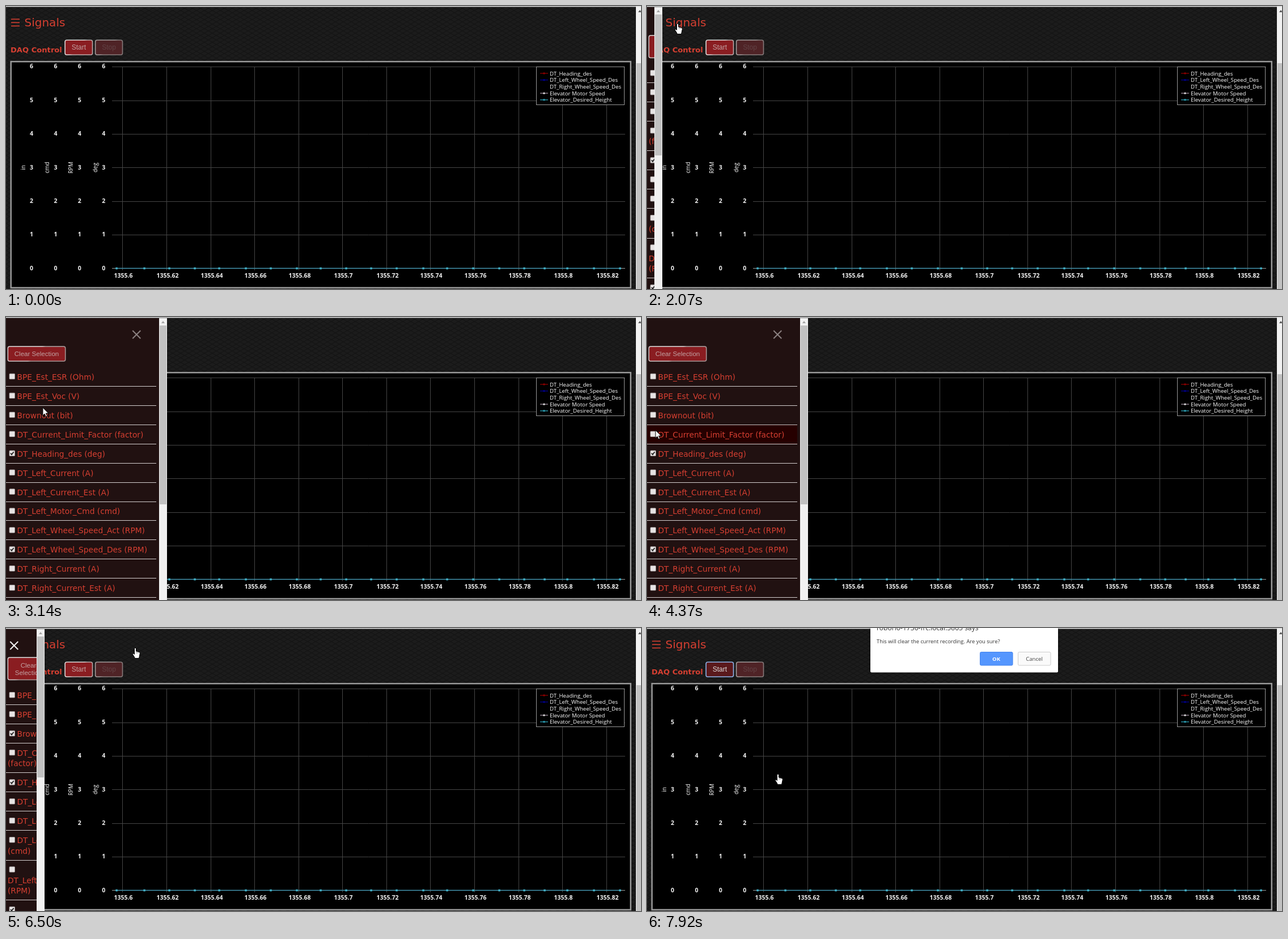
An HTML page with a canvas that plays this animation: 1120x500 px, repeating every 7990 ms.

```html
<!DOCTYPE html>
<html lang="en">
<head>
<meta charset="utf-8">
<title>Signals</title>
<style>
html, body { margin: 0; width: 100%; height: 100%; overflow: hidden; background: #1a1a1a; }
canvas { display: block; }
</style>
</head>
<body>
<canvas id="stage" width="1120" height="500"></canvas>
<script>
const ctx = document.getElementById('stage').getContext('2d');
const LOOP = 7990, PANEL = 284, BAR = 14, RED = '#d63f31';
const VERDANA = '"DejaVu Sans", sans-serif';
const HUMANIST = '"Open Sans", sans-serif';
const ARIAL = '"Liberation Sans", sans-serif';

const signals = ['DT_Heading_des', 'DT_Left_Wheel_Speed_Des', 'DT_Right_Wheel_Speed_Des',
  'Elevator Motor Speed', 'Elevator_Desired_Height'];
const dotColors = ['#f00', '#00f', '#0f0', '#f0f', '#0ff'];
const lineColors = ['#8b0000', '#00008b', '#000', '#9a8a9a', '#2b9db2'];
const samples = [195, 244, 288, 333, 376, 423, 467, 513, 555, 600, 644, 689, 736, 778,
  824, 870, 914, 950, 990, 1037, 1083];
const items = ['BPE_Est_ESR (Ohm)', 'BPE_Est_Voc (V)', 'Brownout (bit)',
  'DT_Current_Limit_Factor (factor)', 'DT_Heading_des (deg)', 'DT_Left_Current (A)',
  'DT_Left_Current_Est (A)', 'DT_Left_Motor_Cmd (cmd)', 'DT_Left_Wheel_Speed_Act (RPM)',
  'DT_Left_Wheel_Speed_Des (RPM)', 'DT_Right_Current (A)', 'DT_Right_Current_Est (A)'];

// Pointer path: time, x, y
const path = [[70, 870, 467], [770, 431, 244], [840, 377, 215], [1690, 59, 34], [1920, 54, 31],
  [2520, 54, 31], [2840, 57, 61], [3140, 65, 160], [3690, 20, 217], [3920, 20, 217],
  [4000, 18, 217], [4150, 18, 217], [4750, 10, 171], [5250, 10, 171], [5400, 60, 140],
  [5540, 131, 126], [6080, 226, 40], [6150, 228, 35], [6800, 228, 35], [7230, 110, 75],
  [7480, 110, 75], [7920, 231, 258]];

const clamp = (v, lo, hi) => Math.min(hi, Math.max(lo, v));

function pointer(t) {
  let i = path.findIndex(p => p[0] > t);
  if (i < 0) return path[path.length - 1].slice(1);
  if (!i) return path[0].slice(1);
  const [t0, x0, y0] = path[i - 1], [t1, x1, y1] = path[i], k = (t - t0) / (t1 - t0);
  return [x0 + (x1 - x0) * k, y0 + (y1 - y0) * k];
}

// CSS "ease": cubic-bezier(.25, .1, .25, 1)
function ease(x) {
  if (x <= 0 || x >= 1) return clamp(x, 0, 1);
  const bez = (a, b, s) => 3 * a * s * (1 - s) ** 2 + 3 * b * s * s * (1 - s) + s ** 3;
  let lo = 0, hi = 1;
  for (let i = 0; i < 20; i++) {
    const mid = (lo + hi) / 2;
    if (bez(.25, .25, mid) < x) lo = mid; else hi = mid;
  }
  return bez(.1, 1, lo);
}

function rect(x, y, w, h, fill) {
  ctx.fillStyle = fill;
  ctx.fillRect(x, y, w, h);
}

function line(points, color, width = 1, close = false) {
  ctx.beginPath();
  points.forEach(([x, y]) => ctx.lineTo(x, y));
  if (close) ctx.closePath();
  ctx.strokeStyle = color;
  ctx.lineWidth = width;
  ctx.stroke();
}

function disc(x, y, r, fill) {
  ctx.beginPath();
  ctx.arc(x, y, r, 0, 7);
  ctx.fillStyle = fill;
  ctx.fill();
}

function text(s, x, y, font, color, align = 'left') {
  ctx.font = font;
  ctx.fillStyle = color;
  ctx.textAlign = align;
  ctx.fillText(s, x, y);
}

function roundBox(x, y, w, h, r, fill, stroke, width = 1) {
  ctx.beginPath();
  ctx.roundRect(x, y, w, h, r);
  ctx.fillStyle = fill;
  ctx.fill();
  if (stroke) {
    ctx.strokeStyle = stroke;
    ctx.lineWidth = width;
    ctx.stroke();
  }
}

// Outset border: light at the top left, darker at the bottom right.
function outset(x, y, w, h, light, dark) {
  const g = ctx.createLinearGradient(x + w / 2 - h / 2, y, x + w / 2 + h / 2, y + h);
  g.addColorStop(.45, light);
  g.addColorStop(.55, dark);
  return g;
}

function button(lines, x, y, w, h, fill, border, color, size) {
  roundBox(x + .8, y + .8, w - 1.6, h - 1.6, 3, fill, border, 1.6);
  lines.forEach((s, i) => text(s, x + w / 2, y + h / 2 + 4.2 + (i - (lines.length - 1) / 2) * 13,
    size + 'px ' + ARIAL, color, 'center'));
}

function makeTexture() {
  const tile = document.createElement('canvas');
  tile.width = 14;
  tile.height = 8;
  const g = tile.getContext('2d');
  g.fillStyle = '#1c1c1c';
  g.fillRect(0, 0, 14, 8);
  g.strokeStyle = '#161616';
  g.lineWidth = 1.2;
  g.beginPath();
  g.moveTo(0, 0); g.lineTo(14, 8);
  g.moveTo(14, 0); g.lineTo(0, 8);
  g.stroke();
  return ctx.createPattern(tile, 'repeat');
}
const texture = makeTexture();

function drawPage(t) {
  rect(0, 0, 1120, 500, texture);
  for (let i = 0; i < 3; i++) rect(9, 22.5 + i * 6, 15, 1.6, RED);
  text('Signals', 32.5, 36, '20px ' + VERDANA, RED);
  text('DAQ Control', 8, 82, 'bold 13.1px ' + VERDANA, RED);
  const hover = t > 7200, focus = t > 7530;
  button(['Start'], 103.3, 59.5, 50, 27.5, hover ? '#5a191c' : '#8a1d21',
    focus ? '#8fb4ea' : outset(103, 59, 50, 28, '#e2dada', '#b9a8a8'),
    hover ? '#ddd' : '#c2a3a4', 12);
  button(['Stop'], 156.8, 59.5, 49.5, 27.5, '#4f2326',
    outset(157, 59, 50, 28, '#a39c9c', '#857a7a'), '#624346', 12);
}

function drawChart() {
  rect(7.5, 97, 1095.5, 402, '#999');
  rect(10, 99.5, 1090.5, 397, '#000');
  for (let i = 0; i < 12; i++) {
    const x = Math.round(205.4 + i * 77.57) + .5;
    line([[x, 107], [x, 467]], '#454545');
    text(String(+(1355.6 + i * .02).toFixed(2)), x + 1.5, 479.7, 'bold 10.5px ' + HUMANIST, '#f2f2f2', 'center');
  }
  ['in', 'cmd', 'RPM', 'deg'].forEach((unit, i) => {
    const x = 45 + i * 42.4;
    for (let k = 0; k < 7; k++)
      text(6 - k, x, 110.3 + k * 59.4, 'bold 10.5px ' + HUMANIST, '#f2f2f2', 'center');
    ctx.save();
    ctx.translate(x - 11.5, 285.5);
    ctx.rotate(-Math.PI / 2);
    text(unit, 0, 0, '10px ' + HUMANIST, '#fff', 'center');
    ctx.restore();
  });
  for (let k = 0; k < 7; k++) {
    const y = Math.round(107.3 + k * 59.33) + .5;
    line([[187, y], [1092, y]], k < 6 ? '#454545' : '#999');
  }
  line([[195, 463.5], [1083, 463.5]], '#4496b0', 1.4);
  samples.forEach(x => rect(x - 1.7, 461.8, 3.5, 3.5, '#41aec4'));

  rect(935.5, 107.5, 155, 67, '#000');
  ctx.strokeStyle = '#999';
  ctx.lineWidth = 1;
  ctx.strokeRect(935.5, 107.5, 155, 67);
  signals.forEach((name, i) => {
    const y = 119 + i * 11.7;
    line([[942, y], [956, y]], lineColors[i], 1.3);
    if (i === 3) line([[948, y + .8], [949, y - 1], [950, y + .8]], '#eee', 1.2, true);
    else disc(949, y, 1.8, lineColors[i]);
    text(name, 959, y + 3.5, '9.7px ' + HUMANIST, '#fff');
  });
}

function drawTooltip(t, mx, my) {
  if (t < 70 || t > 1690 || mx < 187 || my < 107) return;
  const px = samples.reduce((a, b) => Math.abs(b - mx) < Math.abs(a - mx) ? b : a);
  line([[px + .5, 108], [px + .5, 463]], '#c0c0c0');
  const x = Math.max(65, px - 171) + .5, y = Math.round(clamp(my - 31, 108, 387)) + .5;
  rect(x, y, 159, 76, 'rgba(0,0,0,.85)');
  ctx.strokeStyle = '#c00000';
  ctx.lineWidth = 1;
  ctx.strokeRect(x, y, 159, 76);
  const time = 1355.6 + (px - 205.5) / 77.6 * .02;
  text(time.toFixed(6), x + .5, y + 10, '8.1px ' + VERDANA, '#f23c2e');
  signals.forEach((name, i) => {
    const ty = y + 22.5 + i * 12.4;
    disc(x + 3.5, ty - 3.3, 3, dotColors[i]);
    text(name + ': ', x + 10.5, ty, '9.45px ' + VERDANA, '#f23c2e');
    const w = ctx.measureText(name + ': ').width;
    text('0', x + 10.5 + w, ty, 'bold 9.45px ' + VERDANA, '#f23c2e');
  });
}

function arrowUp(x, y, color) {
  ctx.beginPath();
  ctx.moveTo(x - 3, y + 2);
  ctx.lineTo(x, y - 2);
  ctx.lineTo(x + 3, y + 2);
  ctx.fillStyle = color;
  ctx.fill();
}

// Splits an item into [string, x, line] pieces that fit before the limit.
function wrap(label, limit) {
  let x = 19.5, row = 0;
  const pieces = [];
  for (const word of label.split(' ')) {
    const w = ctx.measureText(word).width;
    if (x + w > limit) { x = 3; row++; }
    pieces.push([word, x, row]);
    x += w + ctx.measureText(' ').width;
  }
  return pieces;
}

function drawPanel(t, mx, my) {
  const width = Math.round(PANEL * (ease((t - 2026) / 450) - ease((t - 6294) / 450)));
  if (!width) return;
  const inner = width - BAR, limit = Math.max(198, inner - 5), narrow = inner < 108;
  ctx.save();
  ctx.beginPath();
  ctx.rect(0, 2, width, 498);
  ctx.clip();
  rect(0, 2, width, 498, '#211111');

  const cx = width - 53.7, cross = t > 6040 ? '#f1f1f1' : '#8a8080';
  line([[cx - 7, 24], [cx + 7, 38]], cross, 2);
  line([[cx + 7, 24], [cx - 7, 38]], cross, 2);
  const bw = narrow ? 74 : 103, bh = narrow ? 41 : 27.5;
  button(narrow ? ['Clear', 'Selection'] : ['Clear Selection'], 2.5, 51.3, bw, bh, '#8a1d21',
    outset(2.5, 51.3, bw, bh, '#d2c8c8', '#a89595'), '#c2a3a4', 11.6);

  const before = pointer(t - 100)[1];
  let y = narrow ? 118.8 : 105.5;
  items.forEach((label, i) => {
    const font = '13.75px ' + VERDANA;
    ctx.font = font;
    const pieces = wrap(label, limit), extra = pieces[pieces.length - 1][2] * 18.4;
    const top = y - 16.4, bottom = y + 16.9 + extra;
    const within = v => v > top && v < bottom;
    if (t > 2900 && t < 6200 && mx < 265 && within(my) && within(before))
      rect(0, top, limit, bottom - top, '#260000');
    roundBox(6, y - 5.3, 9.5, 9.5, 1, '#e8e4e4', '#a09a9a', .8);
    if ([4, 9].includes(i) || i === 2 && t >= 5060)
      line([[8, y - .6], [10, y + 1.8], [13.6, y - 3]], '#222', 1.8);
    pieces.forEach(([word, x, row]) => text(word, x, y + 5.4 + row * 18.4, font, RED));
    line([[0, Math.floor(bottom) + .5], [limit, Math.floor(bottom) + .5]], '#d5d0d0');
    y += 33.94 + extra;
  });

  rect(inner, 2, BAR, 498, '#f1f1f1');
  rect(inner + 1, 15, BAR - 2, inner < 250 ? 249 : 316, '#c1c1c1');
  arrowUp(inner + 7, 9, '#a3a3a3');
  ctx.restore();
}

function drawDialog(t) {
  if (t < 7840) return;
  const b = 78 * Math.min(1, (t - 7840) / 75);
  ctx.save();
  ctx.shadowColor = 'rgba(0,0,0,.5)';
  ctx.shadowBlur = 4;
  roundBox(394, b - 100, 331, 100.5, 2, '#fff');
  ctx.restore();
  text('roborio-1736-frc.local:5805 says', 405, b - 74.5, '12.1px ' + HUMANIST, '#333');
  text('This will clear the current recording. Are you sure?', 405, b - 51, '9.4px ' + HUMANIST, '#333');
  roundBox(587.5, b - 35.5, 57.5, 23.5, 2, '#5596fe', '#4383ee');
  text('OK', 616, b - 20.5, 'bold 9.6px ' + HUMANIST, '#fff', 'center');
  roundBox(654.5, b - 35.5, 57.5, 23.5, 2, '#fafafa', '#ccc');
  text('Cancel', 683, b - 20.5, '9.6px ' + HUMANIST, '#444', 'center');
}

const arrowShape = new Path2D('M0 0V14L3.2 11L5.5 16L7.7 15L5.5 10H9.8Z');
const handShape = new Path2D('M-1.5 1Q0 -1 1.5 1V6L7 7.5Q8.5 8 8.3 10L7.5 14L6.5 18.5H-.5L-2 15.5L-4.6 11.5Q-5 9.5 -3 10L-1.5 11.5Z');

function drawPointer(t, x, y) {
  if (t < 70) return;
  const hand = t > 1640 && t < 2500 || t > 6110 && t < 6840 || t > 7180;
  ctx.save();
  ctx.translate(x, y);
  ctx.fillStyle = '#fff';
  ctx.strokeStyle = '#000';
  ctx.lineWidth = 1;
  ctx.lineJoin = 'round';
  ctx.fill(hand ? handShape : arrowShape);
  ctx.stroke(hand ? handShape : arrowShape);
  if (hand) [2.5, 4.8].forEach(k => line([[k, 7], [k, 10]], '#555', .6));
  ctx.restore();
}

function draw() {
  const t = performance.now() % LOOP, [mx, my] = pointer(t);
  drawPage(t);
  drawChart();
  drawTooltip(t, mx, my);
  drawPanel(t, mx, my);
  rect(1111, 0, 9, 500, '#f1f1f1');
  rect(1112, 101, 8, 399, '#c1c1c1');
  arrowUp(1118, 9, '#555');
  rect(0, 0, 1120, 1.5, '#dcdcdc');
  drawDialog(t);
  drawPointer(t, mx, my);
  requestAnimationFrame(draw);
}
draw();
</script>
</body>
</html>
```
